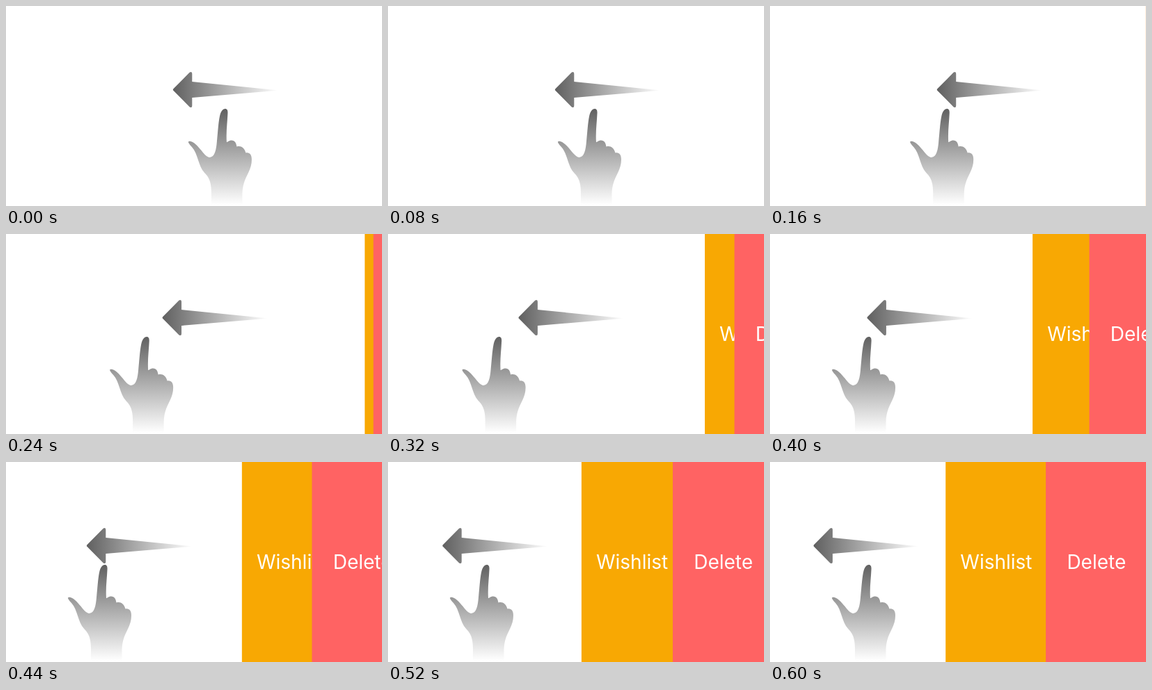
An HTML page that plays this animation: 540 by 288 pixels, repeating every 1600 ms.

```html
<!DOCTYPE html>
<html lang="en">
<head>
<meta charset="utf-8">
<title>Swipe to reveal actions</title>
<style>
  html, body { margin: 0; height: 100%; overflow: hidden; background: #fff; }
  svg { display: block; width: 540px; height: 288px; }
  text { font: 28px Inter, sans-serif; fill: #fff; text-anchor: middle; }
</style>
</head>
<body>
<svg viewBox="0 0 540 288">
  <defs>
    <linearGradient id="arrowFade" gradientUnits="userSpaceOnUse" x1="240" y1="0" x2="392" y2="0">
      <stop stop-color="#606060"/><stop offset="1" stop-color="#fff"/>
    </linearGradient>
    <linearGradient id="handFade" gradientUnits="userSpaceOnUse" x1="0" y1="148" x2="0" y2="286">
      <stop stop-color="#606060"/><stop offset="1" stop-color="#fff"/>
    </linearGradient>
  </defs>
  <path id="arrow" fill="url(#arrowFade)" d="M240.4 119.2 L263.8 95.6 Q267.3 93.6 267.3 97.5 V109 L392 121.5 L267.3 132 V143.5 Q267.3 147.4 263.8 145.4 L240.4 121.8 Q239.3 120.5 240.4 119.2Z"/>
  <path id="hand" fill="url(#handFade)" d="M315 148 C318 148 318.8 151 318.5 155 C318 168 316 181 317 196 C319 196 320 193.5 324 193.5 C329 193.5 330.5 197 331.5 202.5 C337 201 342 203 344.5 211.5 C350 210.5 353 214 353 221 C353 240 340 246 339.5 270 V288 H295 V270 C295 255 292.5 247 285 240 C276 230 276 213 267 203 C263 198.500 262 197 262 195.500 C262.500 194 266 194.500 269 196.500 C279 203 285 217 292.500 218 C300 217.500 302 207 303 195 C304.500 180 305 169 307 159 C308.500 152 311 148 315 148Z"/>
  <g id="wishlist">
    <rect width="288" height="288" fill="#f8a803"/>
    <text x="72.7" y="154">Wishlist</text>
  </g>
  <g id="delete">
    <rect width="144" height="288" fill="#ff6363"/>
    <text x="72.7" y="154">Delete</text>
  </g>
</svg>
<script>
  const LOOP = 1600, STEP = 40, MOVE_END = 600;
  const byId = id => document.getElementById(id);
  const [arrow, hand, wishlist, del] = ['arrow', 'hand', 'wishlist', 'delete'].map(byId);

  const ease = (t, start, duration) => {
    const u = Math.min(1, Math.max(0, (t - start) / duration));
    return (1 - Math.cos(Math.PI * u)) / 2;
  };
  const moveTo = (el, x) => el.setAttribute('transform', `translate(${x.toFixed(2)} 0)`);

  function draw(now) {
    const t = Math.min(MOVE_END, Math.floor(now % LOOP / STEP) * STEP);
    const reveal = ease(t, 154, 454);
    moveTo(hand, -173 * ease(t, -6, 411));
    moveTo(arrow, -177.5 * reveal);
    moveTo(wishlist, 540 - 288 * reveal);
    moveTo(del, 540 - 144 * reveal);
  }

  const begin = performance.now();
  function tick() {
    draw(performance.now() - begin);
    requestAnimationFrame(tick);
  }
  tick();
</script>
</body>
</html>
```
